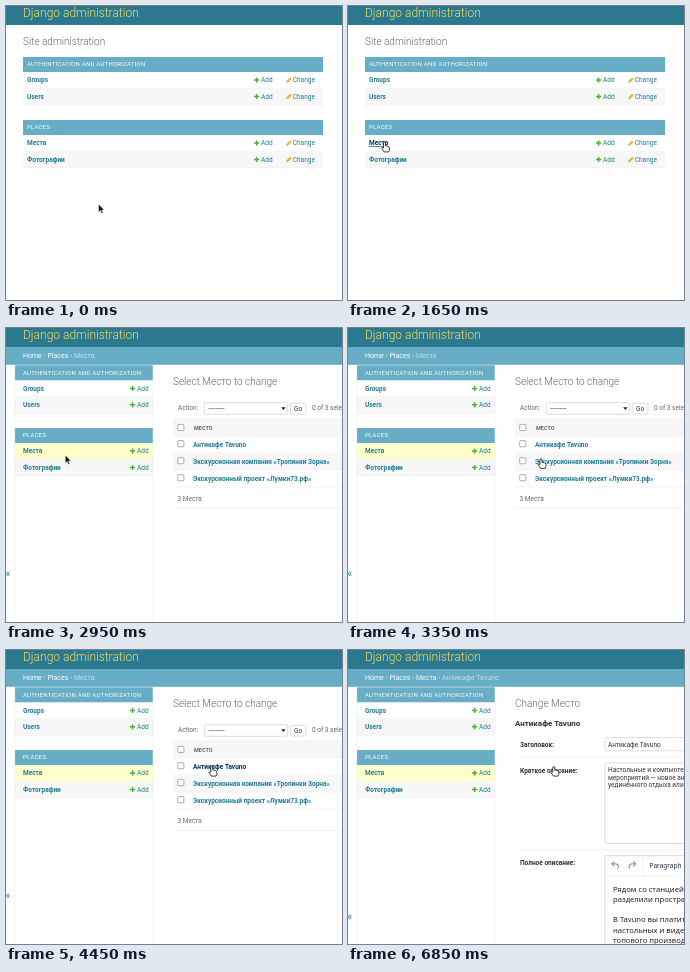
An HTML page that plays this animation: 336 px wide and 294 px high, repeating every 8 s.

```html
<!DOCTYPE html>
<html lang="ru">
<head>
<meta charset="utf-8">
<title>Site administration</title>
<style>
  html, body { margin: 0; width: 100%; height: 100%; overflow: hidden; background: #fff; }
  svg { display: block; width: 336px; height: 294px; }
  text { font: 6.5px Roboto, sans-serif; fill: #666; }
  .brand { font-size: 12px; font-weight: 300; fill: #f5e05d; }
  .title { font-size: 10px; font-weight: 300; }
  .caption { font-size: 6px; letter-spacing: .25px; fill: #fff; }
  .crumbs { font-size: 7px; fill: #c4dfe9; }
  .crumbs tspan { fill: #fff; }
  .link { fill: #217d96; }
  .bold { font-weight: 700; }
  .dark { fill: #333; }
  .hover, .focus { fill: #003350; }
  .focus { text-decoration: underline; }
  .head { font-size: 5.5px; font-weight: 700; }
  .name { font-size: 8px; font-weight: 700; fill: #333; }
  .toggle { font-size: 10px; }
  .rich { font: 500 7.6px "Noto Sans", sans-serif; fill: #222; }
  .tool { font: 6.5px "Noto Sans", sans-serif; fill: #222f3e; }
  .line { fill: none; stroke: #ebebeb; stroke-width: .6; }
  .box { fill: #fff; stroke: #c4c4c4; stroke-width: .6; }
  .icon { fill: none; stroke: #70767f; stroke-width: 1; }
</style>
</head>
<body>
<svg id="stage" viewBox="0 0 336 294"></svg>
<script>
const BLUE = '#67adc5', STRIPE = '#f7f7f7', YELLOW = '#ffffcc';
const PLACE = 'Антикафе Tavuno';

const rect = (x, y, w, h, fill) => `<rect x="${x}" y="${y}" width="${w}" height="${h}" fill="${fill}"/>`;
const box = (x, y, w, h, r = 1.5) => `<rect class="box" x="${x}" y="${y}" width="${w}" height="${h}" rx="${r}"/>`;
const text = (x, y, s, cls = '') => `<text x="${x}" y="${y}" class="${cls}">${s}</text>`;
const hline = (x, y, to) => `<path class="line" d="M${x} ${y}H${to}"/>`;
const target = (x, y, s) => text(x, y, s, 'link bold target');
const plus = (x, y) =>
  `<path d="M${x} ${y}h5.2m-2.6 -2.6v5.2" stroke="#4fae33" stroke-width="1.5" fill="none"/>`;
const pencil = (x, y) =>
  `<path d="M${x} ${y + 2.8}l.7 -2.2 3.4 -3.3 1.6 1.6 -3.4 3.3z" fill="#ecb22f"/>`;

// One app block: caption and rows; `end` is its right edge.
function appBlock(x, y, end, pad, caption, rows, { change = false, current = '' } = {}) {
  let out = rect(x, y, end - x, 15.2, BLUE) + text(x + pad, y + 9.4, caption, 'caption');
  rows.forEach((label, i) => {
    const top = y + 15.2 + i * 16.4, base = top + 10.2;
    const fill = label === current ? YELLOW : i % 2 ? STRIPE : '#fff';
    const addX = change ? end - 69 : end - 23;
    out += rect(x, top, end - x, 16.4, fill) + hline(x, top + 16.2, end);
    out += target(x + pad, base, label) + plus(addX, base - 2.3) + text(addX + 7, base, 'Add', 'link');
    if (change) out += pencil(end - 37, base - 2.3) + text(end - 30.2, base, 'Change', 'link');
  });
  return out;
}

const AUTH = ['AUTHENTICATION AND AUTHORIZATION', ['Groups', 'Users']];
const PLACES = ['PLACES', ['Места', 'Фотографии']];

const header = rect(0, 0, 336, 19, '#2b788f') + text(17, 11.2, 'Django administration', 'brand');

function sidebar(toggleY) {
  return appBlock(9, 37.3, 147, 8, ...AUTH) +
    appBlock(9, 100, 147, 8, ...PLACES, { current: 'Места' }) +
    '<path class="line" d="M8.7 37V294M147 37V294"/>' + text(-.6, toggleY, '«', 'link toggle');
}

const crumbs = s => rect(0, 19, 336, 17.8, BLUE) + text(17, 30.3, s, 'crumbs');

function homePage() {
  return text(17, 38.6, 'Site administration', 'title') +
    appBlock(17, 51, 317, 4, ...AUTH, { change: true }) +
    appBlock(17, 114, 317, 4, ...PLACES, { change: true });
}

function listPage() {
  const names = [PLACE, 'Экскурсионная компания «Тропинки Зорна»', 'Экскурсионный проект «Лумки73.рф»'];
  const check = y => `<rect x="171.7" y="${y - 3.2}" width="6.2" height="6.2" rx="1" fill="#fff" stroke="#777" stroke-width=".6"/>`;
  let out = crumbs('<tspan>Home</tspan> › <tspan>Places</tspan> › Места') + sidebar(249.2) +
    text(167, 56.6, 'Select Место to change', 'title') +
    text(172, 82.3, 'Action:') + box(198.3, 74.7, 83.4, 11.6) + text(202.5, 82.5, '---------', 'dark') +
    '<path d="M275.2 79.3h4.4l-2.2 2.6z" fill="#222"/>' +
    box(284.3, 75.3, 15.6, 10.8) + text(288, 82.9, 'Go', 'dark') + text(306, 82.3, '0 of 3 selected') +
    rect(167, 91, 169, 17, STRIPE) + hline(167, 91, 336) + hline(167, 108, 336) +
    check(99.6) + text(188, 102, 'МЕСТО', 'head');
  names.forEach((name, i) => {
    const top = 108 + i * 17;
    out += (i % 2 ? rect(167, top, 169, 17, STRIPE) : '') + hline(167, top + 17, 336) +
      check(top + 7.8) + target(187, top + 10.7, name);
  });
  return out + text(171.5, 172.5, '3 Места') + hline(167, 180.5, 336);
}

function formPage() {
  const intro = ['Настольные и компьютерные игры,', 'мероприятий — новое антикафе', 'уединённого отдыха или встреч'];
  return crumbs('<tspan>Home</tspan> › <tspan>Places</tspan> › <tspan>Места</tspan> › ' + PLACE) + sidebar(270.2) +
    text(167, 56.6, 'Change Место', 'title') + text(167, 76.4, PLACE, 'name') +
    text(172, 97.2, 'Заголовок:', 'bold dark') + box(257, 87.6, 100, 13.2) + text(260, 96.7, PLACE, 'dark') +
    hline(167, 107, 336) +
    text(172, 123, 'Краткое описание:', 'bold dark') + box(257, 113, 100, 80.5) +
    intro.map((s, i) => text(260, 122 + i * 7.6, s, 'dark')).join('') +
    hline(167, 200, 336) + text(172, 215.4, 'Полное описание:', 'bold dark');
}

function editor() {
  const lines = [[242, 'Рядом со станцией метро'], [252.4, 'разделили пространство'],
    [272, 'В Tavuno вы платите'], [282.6, 'настольных и видеоигр'], [293, 'топового производства']];
  return box(257, 205.8, 100, 100, 0) + hline(257, 226, 336) +
    '<path class="icon" d="M266.3 211.2l-2.7 2.7 2.7 2.7M263.8 213.9h4.2q2.5 .2 2.5 2.6 0 1.2 -.8 2' +
    'M285.2 211.2l2.7 2.7 -2.7 2.7M287.7 213.9h-4.2q-2.5 .2 -2.5 2.6 0 1.2 .8 2"/>' +
    '<path class="line" d="M295.5 206V226"/>' + text(301.5, 217.6, 'Paragraph', 'tool') +
    lines.map(([y, s]) => text(265, y, s, 'rich')).join('');
}

const ARROW = '<path d="M0 0V8.3L1.9 6.6 3.2 9.6 4.6 9 3.3 6.1H5.8Z" fill="#111" stroke="#fff" stroke-width=".5"/>';
const HAND = '<path d="M-1 .9Q0 -.5 1 .9V4Q2.2 3.4 2.8 4.3 3.9 3.9 4.2 4.9 5 5 5 6V7.2Q5 8.3 4.2 9.9H-.5Q-1.4 8 -2.9 6.3 -2.7 5 -1 6Z" fill="#fff" stroke="#111" stroke-width=".8"/>';
const BUSY = '<circle cx="7" cy="8.6" r="2" fill="none" stroke="#777" stroke-width="1"/>';

const group = (id, content) => `<g id="${id}">${content}</g>`;
const stage = document.getElementById('stage');
stage.innerHTML = rect(0, 0, 336, 294, '#fff') + header +
  group('home', homePage()) + group('list', listPage()) + group('form', formPage()) + group('editor', editor()) +
  `<g id="cursor">${group('arrow', ARROW)}${group('hand', HAND)}${group('busy', BUSY)}</g>`;

const $ = id => document.getElementById(id);
const show = (id, on) => $(id).setAttribute('visibility', on ? 'visible' : 'hidden');
const links = page => [...document.querySelectorAll(`#${page} .target`)];
const pages = { home: links('home'), list: links('list'), form: [] };

// Cursor path: time, x, y
const PATH = [
  [300, 92.5, 198], [500, 82, 186], [700, 60, 159], [900, 41, 138], [1000, 39.5, 135.5], [1150, 37.5, 136.3],
  [1500, 37.5, 136.3], [1650, 36.5, 136],
  [2850, 36.5, 136], [3050, 82, 118], [3200, 150, 117], [3300, 185, 126], [3350, 193, 130.5], [3700, 196.5, 129],
  [3800, 199, 115], [3850, 199.5, 110.7], [4000, 200, 111.2],
  [4150, 200, 111.2], [4450, 205.8, 116.2]
];

function cursorAt(t) {
  const i = PATH.findIndex(p => p[0] > t);
  if (i === 0) return PATH[0].slice(1);
  if (i < 0) return PATH[PATH.length - 1].slice(1);
  const [t0, x0, y0] = PATH[i - 1], [t1, x1, y1] = PATH[i];
  const k = (t - t0) / (t1 - t0);
  return [x0 + (x1 - x0) * k, y0 + (y1 - y0) * k];
}

function linkAt(page, [x, y]) {
  return pages[page].find(el => {
    const left = +el.getAttribute('x'), base = +el.getAttribute('y');
    return x > left - 1 && x < left + el.getBBox().width + 2 && y > base - 7 && y < base + 2;
  });
}

function draw(t) {
  const page = t < 2000 ? 'home' : t < 6450 ? 'list' : 'form';
  const pos = cursorAt(t);
  const loading = t >= 6000 && t < 6850;
  const hand = !loading && (page === 'form' || Boolean(linkAt(page, pos)));
  // Link colour trails the pointer by one step; a fresh page waits for a move.
  const settled = t >= 2000 && t < 2900;
  const hovered = settled ? null : linkAt(page, cursorAt(t - 50));
  const focused = page === 'home' && t >= 1550 ? pages.home[2]
    : page === 'list' && t >= 5850 ? pages.list[4] : null;

  for (const name in pages) show(name, name === page);
  for (const el of pages[page]) {
    el.classList.toggle('hover', el === hovered);
    el.classList.toggle('focus', el === focused);
  }
  show('editor', t >= 6850);
  show('hand', hand);
  show('arrow', !hand);
  show('busy', loading);
  $('cursor').setAttribute('transform', `translate(${pos})`);
}

function tick() {
  draw(Math.floor(performance.now() % 8000 / 50) * 50);
  requestAnimationFrame(tick);
}
tick();
</script>
</body>
</html>
```
